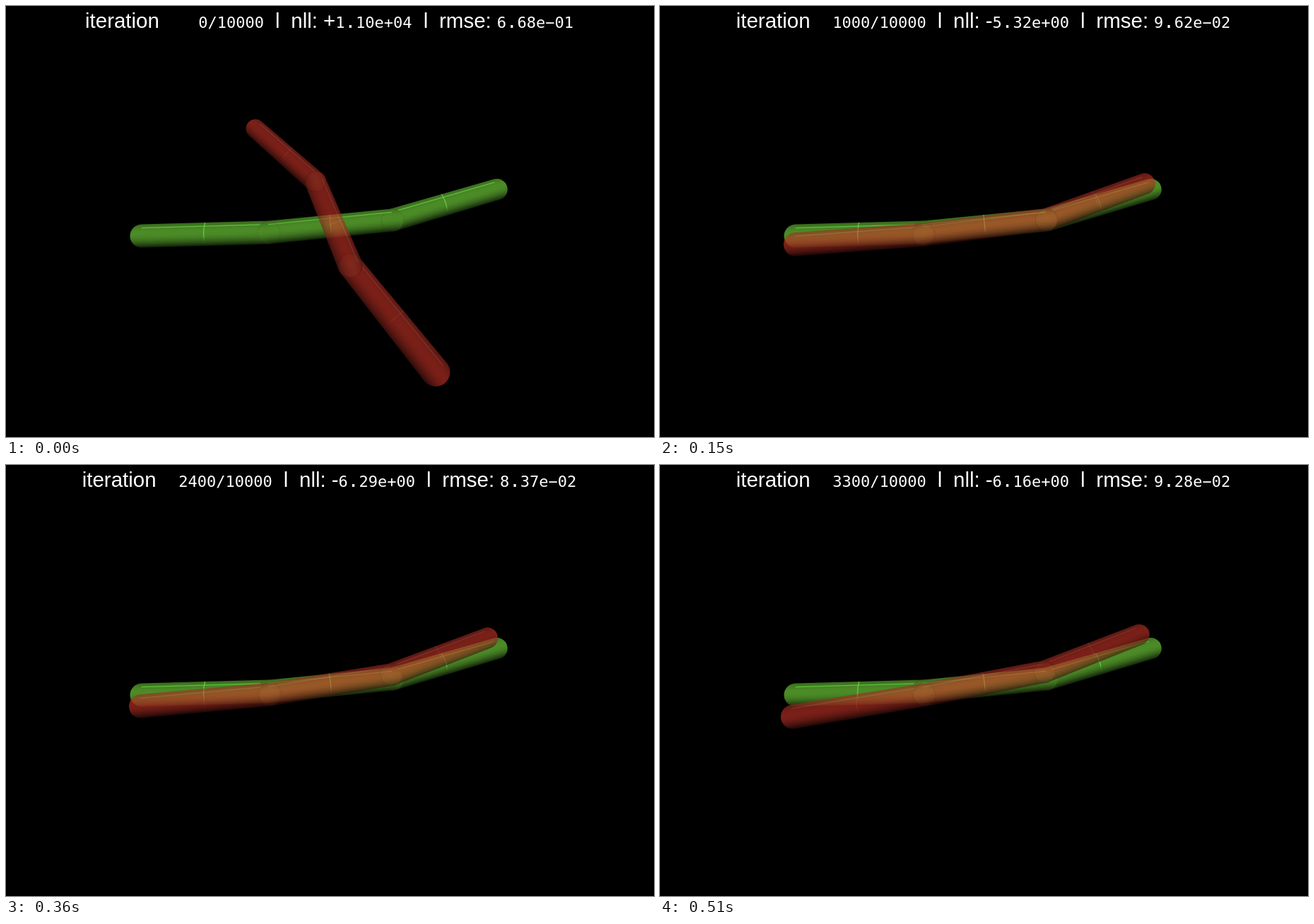
Animation, 917 px wide and 611 px high, one loop 1540 ms. Source, as an HTML page with a canvas:

```html
<!DOCTYPE html>
<html>
<head>
<meta charset="utf-8">
<style>
  html, body { margin: 0; height: 100%; background: #000; overflow: hidden; }
  canvas { display: block; }
</style>
</head>
<body>
<canvas id="stage" width="917" height="611"></canvas>
<script>
const W = 917, H = 611, LOOP = 1540, STEP = 30, LAST = 17, SETTLED = 3;
const stage = document.getElementById('stage').getContext('2d');
const layer = new OffscreenCanvas(W, H).getContext('2d');

const GREEN = { base: [76, 140, 39], seam: 'rgba(100,215,70,.75)', ring: 'rgba(110,225,80,.8)', glow: 0 };
const RED = { base: [204, 54, 41], seam: 'rgba(235,150,130,.4)', ring: 'rgba(235,130,110,.3)', glow: .16 };

// Joint positions from left to right
const TRUTH = [[192, 326], [372, 321], [547, 303.5], [694.5, 260]];
const START = [[353, 174], [438, 249], [487, 368], [608, 519]];
const EARLY = [[195, 320], [373, 324], [547, 304.5], [687, 254]];
const LATE = [[188, 357], [374, 326], [544, 293], [678, 240.5]];

// Caption readings: step, nll, rmse
const READINGS = [
  [0, 1.1e4, .668], [3, -4.87, .0971], [7, -5.77, .0952], [10, -5.9, .103],
  [12, -6.29, .0837], [15, -6.32, .081], [17, -6.16, .0928],
];

const lerp = (a, b, u) => a + (b - a) * u;
const blend = (p, q, u) => p.map((v, i) => lerp(v, q[i], u));
const settle = step => 1 - Math.max(0, 1 - step / SETTLED) ** 5;

// Fast swing into place, then a slow drift; the left end wobbles
function fitAt(step) {
  const u = Math.max(0, (step - SETTLED) / (LAST - SETTLED));
  const wobble = u ** .7 + .3 * (1 - u * u) * Math.sin(2 * Math.PI * u);
  return START.map((p, i) =>
    blend(p, blend(EARLY[i], LATE[i], i ? u : wobble), settle(step)));
}

function readingAt(step) {
  const i = Math.max(1, READINGS.findIndex(k => k[0] >= step));
  const a = READINGS[i - 1], b = READINGS[i];
  return blend(a, b, i === 1 ? settle(step) : (step - a[0]) / (b[0] - a[0]));
}

const shade = (c, k) => `rgb(${c.map(v => Math.round(v * k))})`;

function capsule(g, a, b, look) {
  const dx = b.x - a.x, dy = b.y - a.y, len = Math.hypot(dx, dy);
  const ang = Math.atan2(dy, dx), ux = dx / len, uy = dy / len;
  const nx = uy, ny = -ux; // normal on the lit side
  const mx = (a.x + b.x) / 2, my = (a.y + b.y) / 2, r = (a.r + b.r) / 2;
  const across = () => g.createLinearGradient(mx + nx * r, my + ny * r, mx - nx * r, my - ny * r);

  const fill = across();
  for (let v = 0; v <= 1; v += .1) {
    const k = v < .4 ? 1 - 1.6 * (.4 - v) ** 2 : 1 - 2.2 * (v - .4) ** 2 * (.25 + .75 * Math.abs(ux));
    fill.addColorStop(v, shade(look.base, k));
  }
  g.fillStyle = fill;
  g.beginPath();
  g.arc(a.x, a.y, a.r, ang + Math.PI / 2, ang + Math.PI * 1.5);
  g.arc(b.x, b.y, b.r, ang - Math.PI / 2, ang + Math.PI / 2);
  g.closePath();
  g.fill();

  g.lineWidth = 1.2;
  g.strokeStyle = look.seam;
  g.beginPath();
  for (const p of [a, b]) g.lineTo(p.x + nx * p.r * .69, p.y + ny * p.r * .69);
  g.stroke();

  const ring = across(), bulge = r * (mx - W / 2) / 600;
  ring.addColorStop(.6, look.ring);
  ring.addColorStop(1, 'rgba(0,0,0,0)');
  g.strokeStyle = ring;
  g.beginPath();
  g.moveTo(mx + nx * r, my + ny * r);
  g.quadraticCurveTo(mx + ux * bulge, my + uy * bulge, mx - nx * r, my - ny * r);
  g.stroke();
}

function joint(g, p, look) {
  const glow = g.createRadialGradient(p.x, p.y - 2, 0, p.x, p.y, p.r);
  glow.addColorStop(0, `rgba(255,140,80,${look.glow})`);
  glow.addColorStop(.85, `rgba(255,140,80,${look.glow / 2})`);
  glow.addColorStop(1, 'rgba(0,0,0,.18)');
  g.fillStyle = glow;
  g.beginPath();
  g.arc(p.x, p.y, p.r, 0, Math.PI * 2);
  g.fill();
}

function chain(g, joints, look) {
  // Lower on the stage is nearer, hence thicker
  const p = joints.map(([x, y]) => ({ x, y, r: 10 + y * .02 }));
  for (const i of [0, 2, 1]) capsule(g, p[i], p[i + 1], look);
  joint(g, p[1], look);
  joint(g, p[2], look);
}

const SANS = '29.5px "Liberation Sans", Arial, sans-serif';
const MONO = '22px "DejaVu Sans Mono", monospace';
const POINT = MONO.replace('22', '26');

const sans = text => [[SANS, text]];
// Monospaced digits with a slightly larger point
const mono = text => text.split(/(\.)/).map(s => [s === '.' ? POINT : MONO, s]);
const sci = v => Math.abs(v).toExponential(2).replace(/(\d)$/, '0$1');

function caption(step) {
  const [, nll, rmse] = readingAt(step);
  const count = String(step === LAST ? 3300 : step * 200);
  const runs = [
    ...sans('iteration' + ' '.repeat(8 - count.length)), ...mono(count + '/10000'),
    ...sans('  l  nll: ' + (nll > 0 ? '+' : '-')), ...mono(sci(nll)),
    ...sans('  l  rmse: '), ...mono(sci(rmse).replace('-', '−')),
  ];
  stage.wordSpacing = '-0.3px';
  const widths = runs.map(([font, text]) => {
    stage.font = font;
    return stage.measureText(text).width;
  });
  let x = W / 2 - 1 - widths.reduce((a, b) => a + b) / 2;
  stage.fillStyle = '#fff';
  runs.forEach(([font, text], i) => {
    stage.font = font;
    stage.fillText(text, x, 31);
    x += widths[i];
  });
}

function draw(now) {
  const step = Math.min(LAST, Math.floor(now % LOOP / STEP));
  stage.fillStyle = '#000';
  stage.fillRect(0, 0, W, H);
  chain(stage, TRUTH, GREEN);
  layer.clearRect(0, 0, W, H);
  chain(layer, fitAt(step), RED);
  stage.globalAlpha = .6;
  stage.drawImage(layer.canvas, 0, 0);
  stage.globalAlpha = 1;
  caption(step);
}

const start = performance.now();
(function tick() {
  draw(performance.now() - start);
  requestAnimationFrame(tick);
})();
</script>
</body>
</html>
```
